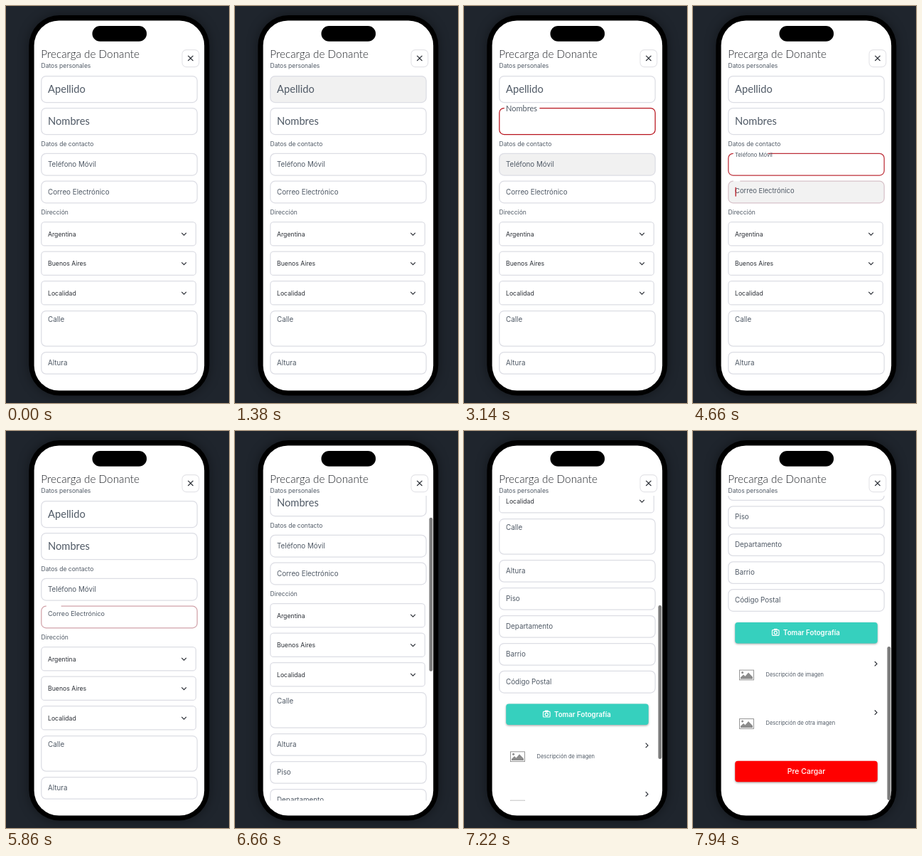
These frames come from a looping animation (314x558 px, 8000 ms). An HTML page with a canvas:

```html
<!DOCTYPE html>
<html lang="es">
<head>
<meta charset="utf-8">
<title>Precarga de Donante</title>
<style>
html, body { margin: 0; width: 100%; height: 100%; overflow: hidden; background: #1f252d; }
canvas { display: block; width: 314px; height: 558px; }
</style>
</head>
<body>
<canvas id="stage"></canvas>
<script>
const W = 314, H = 558, LOOP = 8000, TICK = 80;
const VIEW = { top: 91, bottom: 519.5 };
const INK = '#2b2f36', LABEL = '#505a66', GRAY = [220, 221, 228], RED = [184, 20, 30];
const BODY = 'Inter, "Open Sans", sans-serif', ROUND = 'Lato, sans-serif';

const canvas = document.getElementById('stage');
const ctx = canvas.getContext('2d');
const ratio = window.devicePixelRatio || 1;
canvas.width = W * ratio;
canvas.height = H * ratio;

// Text fields; those with a focus time are tapped during the loop.
const fields = [
  { text: 'Apellido', y: 98.5, h: 37, big: true, hover: 500, focus: 1700, blur: 2580 },
  { text: 'Nombres', y: 143.5, h: 37, big: true, hover: 2340, focus: 2580, blur: 3700 },
  { text: 'Teléfono Móvil', y: 207.4, h: 30.6, hover: 3060, focus: 3700, blur: 4580 },
  { text: 'Correo Electrónico', y: 246.2, h: 30.6, hover: 4340, focus: 4580, blur: 5700 },
  { text: 'Calle', y: 428.5, h: 49.6, labelY: 440.3 },
  { text: 'Altura', y: 486.5, h: 30.6 },
  { text: 'Piso', y: 525.5, h: 30.6 },
  { text: 'Departamento', y: 564.5, h: 30.6 },
  { text: 'Barrio', y: 603.5, h: 30.6 },
  { text: 'Código Postal', y: 642.4, h: 30.6 }
];
const selects = [['Argentina', 303.5], ['Buenos Aires', 345], ['Localidad', 386.5]];
const pictures = [['Descripción de imagen', 762.5], ['Descripción de otra imagen', 831]];

const clamp = v => Math.max(0, Math.min(1, v));
const lerp = (a, b, k) => a + (b - a) * k;
const mix = (a, b, k) => `rgb(${a.map((v, i) => Math.round(lerp(v, b[i], k)))})`;

// cubic-bezier(.4, 0, .2, 1)
function ease(x) {
  let lo = 0, hi = 1;
  for (let i = 0; i < 20; i++) {
    const s = (lo + hi) / 2, r = 1 - s;
    if (1.2 * r * r * s + 0.6 * r * s * s + s ** 3 < x) lo = s; else hi = s;
  }
  return lo * lo * (3 - 2 * lo);
}

function scrollAt(t) {
  if (t < 6660) return 0;
  if (t < 6820) return 61;
  if (t < 6980) return 96;
  if (t < 7220) {
    const k = (t - 6980) / 240;
    return lerp(142, 305, 0.72 * k + 0.28 * k * k);
  }
  return 420 - 115 * Math.exp((7220 - t) / 120);
}

function barAlpha(t) {
  if (t >= 500 && t < 1380) return t < 580 ? 0.5 : 1;
  return t < 6020 ? 0 : t < 6100 ? 0.5 : 1;
}

function focusAt(f, t) {
  if (!f.focus) return 0;
  const ramp = start => ease(clamp((t - start - 16) / 320));
  return t < f.blur ? ramp(f.focus) : 1 - ramp(f.blur);
}

function box(x, y, w, h, r) {
  ctx.beginPath();
  ctx.roundRect(x, y, w, h, r);
}

function fillBox(x, y, w, h, r, color) {
  box(x, y, w, h, r);
  ctx.fillStyle = color;
  ctx.fill();
}

function line(points, color, width) {
  ctx.beginPath();
  points.forEach(([x, y]) => ctx.lineTo(x, y));
  ctx.strokeStyle = color;
  ctx.lineWidth = width;
  ctx.stroke();
}

// y is the middle of the capital letters
function write(text, x, y, size, { color = LABEL, weight = 400, family = BODY, align = 'left' } = {}) {
  ctx.font = `${weight} ${size}px ${family}`;
  ctx.textAlign = align;
  ctx.fillStyle = color;
  ctx.fillText(text, x, y + size * 0.36);
}

function drawField(f, t) {
  const p = focusAt(f, t);
  const size = f.big ? 14.7 : 9.8, family = f.big ? ROUND : BODY;
  const middle = f.labelY || f.y + f.h / 2 - 0.3;

  if (f.hover && t >= f.hover && t < f.focus + 240) {
    ctx.globalAlpha = clamp((t - f.hover + TICK) / 160) * (1 - p);
    fillBox(49.8, f.y, 219.4, f.h, 6.5, '#f1f1f1');
    ctx.globalAlpha = 1;
  }

  ctx.save();
  if (p > 0) {
    ctx.font = `400 ${size}px ${family}`;
    const gap = (ctx.measureText(f.text).width * 0.75 + 5.5) * p;
    ctx.beginPath();
    ctx.rect(0, 0, W, 1000);
    ctx.rect(56.8, f.y - 3, gap, 6);
    ctx.clip('evenodd');
  }
  box(49.8, f.y, 219.4, f.h, 6.5);
  ctx.strokeStyle = mix(GRAY, RED, p);
  ctx.lineWidth = 1.25;
  ctx.stroke();
  ctx.restore();

  write(f.text, 59, lerp(middle, f.y + 0.3, p), size * (1 - 0.25 * p), { family });

  const since = t - f.focus;
  if (t >= f.focus && t < f.blur && (since < 560 || since >= 1040)) {
    const half = f.big ? 9.3 : 6.4, mid = f.y + f.h / 2 - 0.3;
    ctx.fillStyle = mix(RED, RED, 0);
    ctx.fillRect(59.5, mid - half, 1.3, half * 2);
  }
}

function drawSelect([text, y]) {
  box(49.8, y, 217.6, 33.4, 4.5);
  ctx.strokeStyle = mix(GRAY, GRAY, 0);
  ctx.lineWidth = 1.25;
  ctx.stroke();
  write(text, 59, y + 17, 8.7, { color: INK });
  line([[247.3, y + 15.4], [250.6, y + 18.7], [253.9, y + 15.4]], INK, 1.2);
}

function drawButton(y, color) {
  ctx.save();
  ctx.shadowColor = 'rgba(0,0,0,.35)';
  ctx.shadowBlur = 3 * ratio;
  ctx.shadowOffsetY = 1.2 * ratio;
  fillBox(59.2, y, 200.6, 29.5, 4, color);
  ctx.restore();
}

function drawCamera(x, y) {
  ctx.strokeStyle = '#fff';
  ctx.lineWidth = 1.2;
  box(x - 4.8, y - 3.2, 9.6, 7.6, 1);
  ctx.stroke();
  ctx.fillStyle = '#fff';
  ctx.fillRect(x - 2.4, y - 5, 4.8, 2);
  ctx.beginPath();
  ctx.arc(x, y + 0.6, 2.1, 0, Math.PI * 2);
  ctx.stroke();
}

function drawPicture([text, y]) {
  const gray = '#8c8c8c';
  ctx.strokeStyle = gray;
  ctx.lineWidth = 0.9;
  ctx.strokeRect(65.5, y - 6.7, 20, 13.8);
  ctx.fillStyle = gray;
  ctx.beginPath();
  [[67, 5.6], [67, 3.5], [71, -0.4], [73.5, 2], [78, -3.2], [84, 3], [84, 5.6]]
    .forEach(([x, dy]) => ctx.lineTo(x, y + dy));
  ctx.fill();
  ctx.beginPath();
  ctx.arc(69.6, y - 3.2, 1.5, 0, Math.PI * 2);
  ctx.fill();
  write(text, 102.5, y - 0.6, 7.5);
  line([[255.8, y - 18.8], [259, y - 15.6], [255.8, y - 12.4]], INK, 1.2);
}

function drawPhone() {
  ctx.fillStyle = '#1f252d';
  ctx.fillRect(0, 0, W, H);
  ctx.save();
  ctx.shadowColor = 'rgba(0,0,0,.4)';
  ctx.shadowBlur = 16 * ratio;
  fillBox(32.3, 13, 254, 534.5, 43, '#000');
  ctx.restore();
  fillBox(39.6, 20.4, 239.6, 520.2, 35, '#fff');
  fillBox(121.5, 28, 76.6, 21.8, 10.9, '#000');
}

function drawHeader() {
  write('Precarga de Donante', 49.3, 67.6, 15.3, { color: '#1f2227', family: ROUND, weight: 300 });
  write('Datos personales', 49.5, 84, 8.5);
  box(248, 61.6, 23.8, 24, 6);
  ctx.strokeStyle = '#e4e4e8';
  ctx.lineWidth = 1.1;
  ctx.stroke();
  line([[256.3, 69.8], [263.5, 77]], INK, 1.2);
  line([[263.5, 69.8], [256.3, 77]], INK, 1.2);
}

function drawForm(t, scroll) {
  ctx.save();
  ctx.beginPath();
  ctx.rect(40, VIEW.top, 239, VIEW.bottom - VIEW.top);
  ctx.clip();
  ctx.translate(0, -scroll);
  write('Datos de contacto', 49.5, 193.7, 8.55);
  write('Dirección', 49.5, 290, 8.55);
  fields.forEach(f => drawField(f, t));
  selects.forEach(drawSelect);
  drawButton(688.6, '#36d0be');
  drawCamera(116.3, 702.6);
  write('Tomar Fotografía', 127, 703.3, 9.7, { color: '#fff', weight: 600 });
  pictures.forEach(drawPicture);
  drawButton(883.5, '#ff0000');
  write('Pre Cargar', 159.5, 898.2, 10.5, { color: '#fff', weight: 500, align: 'center' });
  ctx.restore();
}

function draw(time) {
  const t = Math.floor((time % LOOP - 20) / TICK) * TICK + 20;
  const scroll = scrollAt(t);
  ctx.setTransform(ratio, 0, 0, ratio, 0, 0);
  drawPhone();
  drawHeader();
  drawForm(t, scroll);
  ctx.globalAlpha = barAlpha(t);
  fillBox(273.5, VIEW.top + scroll * 0.505, 4.8, 216, 2.4, '#7c7c7c');
  ctx.globalAlpha = 1;
}

const start = performance.now();
function loop() {
  draw(performance.now() - start);
  requestAnimationFrame(loop);
}
loop();
</script>
</body>
</html>
```
